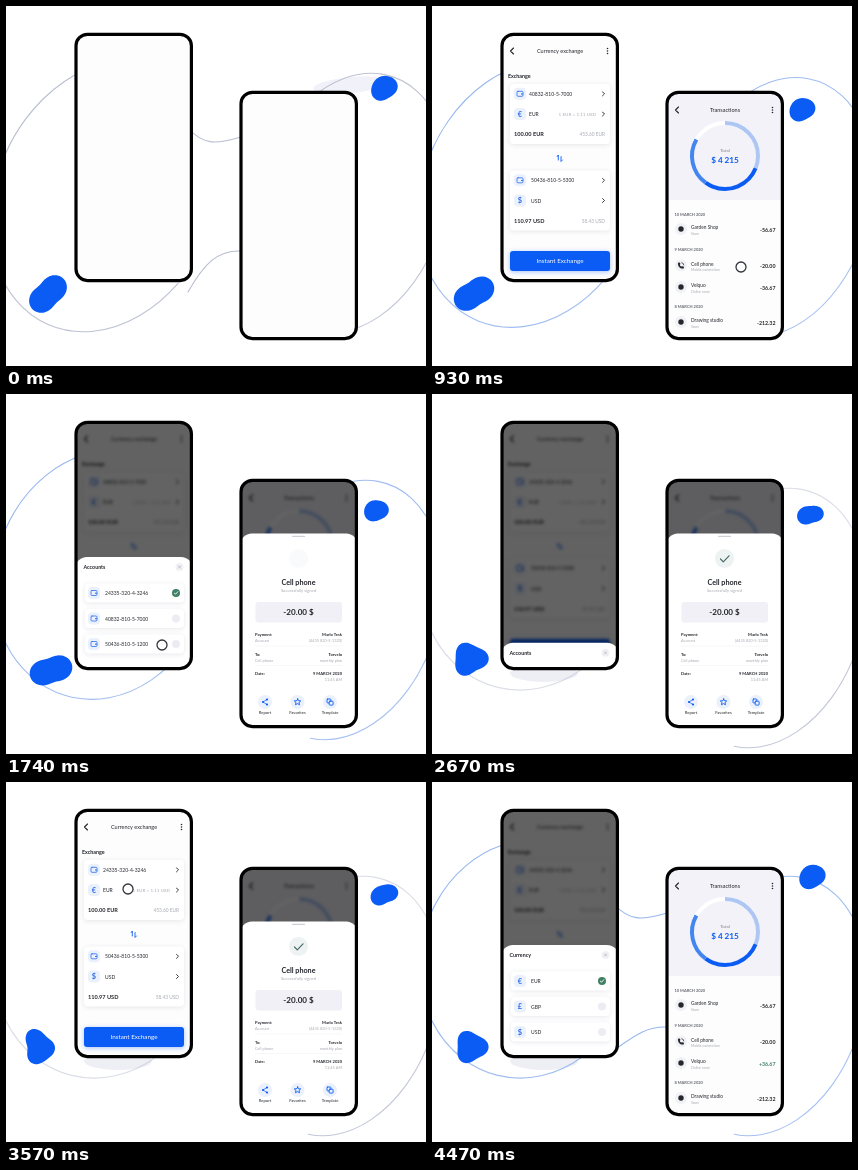
Animation of 420 by 360 pixels, one loop 4.5 s. Source, as an HTML page with a canvas:

```html
<!DOCTYPE html>
<html lang="en">
<head>
<meta charset="utf-8">
<title>Banking app</title>
<style>
html, body { margin: 0; width: 100%; height: 100%; overflow: hidden; background: #fff; }
canvas { display: block; width: 420px; height: 360px; }
</style>
</head>
<body>
<canvas id="stage"></canvas>
<script>
const W = 420, H = 360, LOOP = 4500, TAU = Math.PI * 2;
const PHONE_W = 115.4, PHONE_H = 246.3;
const BLUE = '#0a5cf5', INK = '#24262c', GREY = '#a6a9b2', PALE = '#eaf0fc', GREEN = '#3f7f63';
const ratio = window.devicePixelRatio || 1;
const stage = document.getElementById('stage'), buffer = document.createElement('canvas');
const [main, layer] = [stage, buffer].map(canvas => {
  canvas.width = W * ratio;
  canvas.height = H * ratio;
  const ctx = canvas.getContext('2d');
  ctx.scale(ratio, ratio);
  return ctx;
});
let g = main;

// Timing
const clamp = v => Math.min(1, Math.max(0, v));
const lerp = (a, b, u) => a + (b - a) * u;
const ramp = (t, a, b) => { const u = clamp((t - a) / (b - a)); return u * u * (3 - 2 * u); };
const easeOut = (t, a, b) => 1 - (1 - clamp((t - a) / (b - a))) ** 3;

// Drawing helpers
function text(str, x, y, size, color = INK, weight = 400, align = 'left') {
  g.font = `${weight} ${size}px Lato, Inter, sans-serif`;
  g.textAlign = align;
  g.fillStyle = color;
  g.fillText(str, x, y);
}
function box(x, y, w, h, r, color) {
  g.beginPath();
  g.roundRect(x, y, w, h, r);
  g.fillStyle = color;
  g.fill();
}
function dot(x, y, r, color) {
  g.beginPath();
  g.arc(x, y, r, 0, TAU);
  g.fillStyle = color;
  g.fill();
}
function stroke(color, width) {
  g.strokeStyle = color;
  g.lineWidth = width;
  g.lineCap = g.lineJoin = 'round';
  g.stroke();
}
function line(color, width, ...p) {
  g.beginPath();
  for (let i = 0; i < p.length; i += 2) g.lineTo(p[i], p[i + 1]);
  stroke(color, width);
}
function arc(x, y, r, from, to, color, width) {
  g.beginPath();
  g.arc(x, y, r, from, to);
  g.strokeStyle = color;
  g.lineWidth = width;
  g.lineCap = 'butt';
  g.stroke();
}
function shadowBox(x, y, w, h, r, color, shadow) {
  g.save();
  g.shadowColor = shadow;
  g.shadowBlur = 5 * ratio;
  g.shadowOffsetY = ratio;
  box(x, y, w, h, r, color);
  g.restore();
}
const card = (x, y, w, h) => shadowBox(x, y, w, h, 4, '#fff', 'rgba(40,50,90,.11)');
const chevron = (x, y) => line(INK, .9, x - 1, y - 2, x + 1, y, x - 1, y + 2);
function topBar(title, x, y) {
  line(INK, 1.1, x - 46.5, y - 3, x - 49.5, y, x - 46.5, y + 3);
  text(title, x, y + 1.7, 5.5, INK, 400, 'center');
  for (const dy of [-2.5, 0, 2.5]) dot(x + 47.5, y + dy, .8, INK);
}
function tile(symbol, x, y) {
  box(x - 6, y - 6, 12, 12, 4, PALE);
  if (symbol !== 'wallet') return text(symbol, x, y + 2.6, 7.4, '#2f6fe8', 700, 'center');
  g.beginPath();
  g.roundRect(x - 3, y - 2.5, 6, 5, 1);
  stroke('#2f6fe8', .8);
  line('#2f6fe8', .9, x + 1, y + .2, x + 2.8, y + .2);
}

// Blob outline: a circle bent by a two-lobed and a three-lobed wave
function blob(x, y, size, stretch, tilt, corners) {
  g.beginPath();
  for (let a = 0; a < TAU; a += .08) {
    const r = size * (1 + stretch * Math.cos(2 * (a - tilt)) + corners * Math.cos(3 * a));
    g.lineTo(x + r * Math.cos(a), y + r * Math.sin(a));
  }
  g.fillStyle = BLUE;
  g.fill();
}
function blobs(t) {
  const turn = ramp(t, 1740, 3400), back = ramp(t, 3800, 4470);
  blob(42 + 3 * ramp(t, 900, 1740) - 12 * turn + 6 * back, 288 - 23 * ramp(t, 800, 2670), 17 - 1.7 * turn,
    .28 - .4 * turn + .13 * back, -.78 + .48 * ramp(t, 200, 1740), .14 * ramp(t, 1740, 2670));
  const swing = Math.sin(Math.PI * t / 5000);
  blob(378 - 8 * (ramp(t, 0, 900) - ramp(t, 1740, 2600)) + 2 * back, 82 + 39 * swing, 12.6 - 1.6 * swing ** 2,
    .1 + .12 * (ramp(t, 1740, 2670) - back), -.6 + .4 * swing ** 2, .04);
}

// Two tilted rings behind the phones, joined by two short curves
function rings(t) {
  const shift = ramp(t, 400, 2500);
  const seen = 1 - ramp(t, 1700, 2600) + ramp(t, 3960, 4400);
  const joined = 1 - ramp(t, 200, 900) + ramp(t, 3960, 4400);
  const tint = ramp(t, 0, 900) * seen;
  const color = `rgb(${lerp(184, 150, tint)},${lerp(189, 182, tint)},${lerp(208, 240, tint)})`;
  const draw = alpha => {
    g.globalAlpha = clamp(alpha);
    stroke(color, 1.1);
  };
  const left = (from, to, alpha) => {
    g.beginPath();
    g.ellipse(lerp(100, 95, shift), lerp(190, 177, shift), lerp(109, 106, shift), lerp(141, 120, shift),
      lerp(.44, .27, shift), from, to);
    draw(alpha);
  };
  const right = (from, to, alpha) => {
    g.beginPath();
    g.ellipse(345 - 8 * shift, 197 + 27 * shift, 93, 133, .314, from, to);
    draw(alpha);
  };
  left(.35, 2.6, .5 + .4 * seen);
  left(2.6, 4.3, seen);
  right(-2.45, -.35, .5 + .4 * seen);
  right(-.35, 1.5, .85);
  for (const [y1, y2, y3, y4] of [[122, 140, 138, 131], [286 - 18 * shift, 258, 244, 245]]) {
    g.beginPath();
    g.moveTo(182, y1);
    g.bezierCurveTo(198, y2, 211, y3, 235, y4);
    draw(joined);
  }
}
function background(t) {
  g.globalAlpha = 1 - ramp(t, 0, 500);
  g.beginPath();
  g.ellipse(345, 79, 38, 8, -.1, 0, TAU);
  g.fillStyle = '#f1f2f9';
  g.fill();
  g.globalAlpha = ramp(t, 2000, 2600);
  g.beginPath();
  g.ellipse(112, 279, 34, 9, 0, 0, TAU);
  g.fillStyle = '#eeeef5';
  g.fill();
  rings(t);
  g.globalAlpha = 1;
  blobs(t);
}

// Left phone
const ACCOUNTS = ['24335-320-4-3246', '40832-810-5-7000', '50436-810-5-1200'];

function exchangeScreen(t) {
  box(69, 27, 118, 250, 0, '#fdfdfd');
  g.globalAlpha = ramp(t, 60, 450);
  topBar('Currency exchange', 128, 45);
  text('Exchange', 76, 72, 5.35, INK, 700);
  g.globalAlpha = ramp(t, 150, 600);
  exchangeCard(78, 97, ACCOUNTS[t < 2300 ? 1 : 0], '€', 'EUR', '100.00 EUR', '453.60 EUR');
  text('1 EUR = 1.11 USD', 164, 110, 4.6, GREY, 400, 'right');
  line(BLUE, .9, 125, 150.5, 126.3, 149, 126.3, 154);
  line(BLUE, .9, 129, 150.5, 129, 155.5, 130.4, 154);
  g.globalAlpha = ramp(t, 300, 750);
  exchangeCard(164.5, 99, '50436-810-5-5300', '$', 'USD', '110.97 USD', '58.43 USD');
  g.globalAlpha = ramp(t, 400, 850);
  shadowBox(78, 245, 100, 20, 3, BLUE, 'rgba(10,92,245,.35)');
  text('Instant Exchange', 128, 257.4, 6.3, '#fff', 400, 'center');
  g.globalAlpha = 1;
}
function exchangeCard(y, x, account, symbol, code, sum, rest) {
  card(78, y, 100, 60);
  [['wallet', account], [symbol, code]].forEach(([icon, label], i) => {
    const mid = y + 9.8 + 20.2 * i;
    tile(icon, 88, mid);
    text(label, x, mid + 2, 5);
    chevron(171.5, mid);
  });
  text(sum, 82, y + 52.2, 5.6, INK, 700);
  text(rest, 173, y + 52.2, 4.8, GREY, 400, 'right');
}
function choiceSheet(title, rows, checked, rise) {
  g.save();
  g.translate(0, (1 - rise) * 112);
  box(69, 163, 118, 130, 12, '#fff');
  text(title, 77.5, 175.3, 5.3, INK, 700);
  dot(173.5, 173, 4, '#f1f1f5');
  line(GREY, .6, 172.3, 171.8, 174.7, 174.2);
  line(GREY, .6, 174.7, 171.8, 172.3, 174.2);
  rows.forEach(([symbol, label], i) => {
    const y = 199 + i * 25.5;
    card(79, y - 9.5, 99, 19);
    tile(symbol, 88, y);
    text(label, 99, y + 2, 5);
    dot(170, y, 4, i === checked ? GREEN : '#ececf3');
    if (i === checked) line('#fff', .9, 168.3, y, 169.5, y + 1.3, 171.8, y - 1.3);
  });
  g.restore();
}
function leftSheets(t) {
  if (t < 3200) {
    choiceSheet('Accounts', ACCOUNTS.map(a => ['wallet', a]), t < 1620 ? 1 : 0,
      easeOut(t, 1360, 1680) - ramp(t, 2450, 2772));
  } else {
    choiceSheet('Currency', [['€', 'EUR'], ['£', 'GBP'], ['$', 'USD']], 0, easeOut(t, 3990, 4350));
  }
}

// Right phone
function handset(x, y) {
  arc(x + 2.2, y - 2.2, 4.6, Math.PI * .55, Math.PI * .95, INK, 1.5);
  dot(x - 1.9, y - 1.7, 1.2, INK);
  dot(x + 1.7, y + 1.9, 1.2, INK);
  arc(x + .2, y - .2, 2.6, -1.5, 0, INK, .7);
}
function donut(sweep) {
  const angle = degrees => (degrees - 90) * Math.PI / 180;
  arc(293, 150, 33, 0, TAU, '#fff', 4);
  for (const [from, to, color] of [[0, 112, '#adc6f3'], [112, 216, BLUE], [216, 300, '#4585ef']]) {
    if (sweep > from) arc(293, 150, 33, angle(from), angle(Math.min(to, sweep)), color, 4);
  }
  text('Total', 293, 146.3, 4.6, '#80848f', 400, 'center');
  text('$ 4 215', 293, 157.4, 8.2, BLUE, 700, 'center');
}
function transactionsScreen(t) {
  box(234, 85, 118, 250, 0, '#fdfdfd');
  g.globalAlpha = ramp(t, 60, 400);
  box(234, 85, 118, 109, 0, '#f2f2f8');
  topBar('Transactions', 293, 104);
  donut(ramp(t, 150, 880) * 300);
  g.globalAlpha = ramp(t, 250, 650);
  dateHeading('10 MARCH 2020', 210);
  transaction(223, 'Garden Shop', 'Store', '-56.67');
  g.globalAlpha = ramp(t, 350, 750);
  dateHeading('9 MARCH 2020', 245);
  transaction(259.5, 'Cell phone', 'Mobile connection', '-20.00');
  const received = t > 4150;
  transaction(281, 'Velquo', 'Online store', received ? '+36.67' : '-36.67', received ? GREEN : INK);
  g.globalAlpha = ramp(t, 450, 850);
  dateHeading('8 MARCH 2020', 302);
  transaction(316, 'Drawing studio', 'Store', '-212.32');
  g.globalAlpha = 1;
}
const dateHeading = (date, y) => text(date, 242.5, y, 4, '#62656e', 700);
function transaction(y, name, kind, sum, color = INK) {
  dot(249, y, 6, '#f0f1f5');
  if (name === 'Cell phone') handset(249, y);
  else dot(249, y, 2.7, INK);
  text(name, 259, y + .4, 4.8);
  text(kind, 259, y + 5.5, 3.5, GREY);
  text(sum, 343.5, y + 2.6, 5.3, color, 700, 'right');
}
function receiptSheet(t) {
  const rise = easeOut(t, 1080, 1500) - ramp(t, 3640, 4005);
  g.save();
  g.translate(0, (1 - rise) * 195);
  box(234, 139.5, 118, 215, 12, '#fff');
  box(286, 141.8, 13, 1.2, .6, '#cfd0d6');
  g.globalAlpha = ramp(t, 1560, 2000);
  dot(292.5, 164.5, 9.5, '#edf2f3');
  g.globalAlpha = 1;
  const tick = ramp(t, 1900, 2250);
  if (tick > 0) {
    g.setLineDash([13 * tick, 20]);
    line('#4d6b66', 1.2, 288.5, 165, 291.3, 167.8, 297, 161.8);
    g.setLineDash([]);
  }
  text('Cell phone', 292.5, 190.7, 7.2, INK, 700, 'center');
  text('Successfully signed', 292.5, 198, 4.2, GREY, 400, 'center');
  box(249.5, 208, 86.5, 20.5, 3, '#f0f0f6');
  text('-20.00 $', 292.5, 221, 8.1, INK, 700, 'center');
  [['Payment:', 'Marlo Tesk', 'Account', '(4435 820-5-1320)'],
   ['To:', 'Torvelo', 'Cell phone', 'monthly plan'],
   ['Date:', '9 MARCH 2020', '', '11:45 AM']].forEach(([label, value, note, detail], i) => {
    const y = 242 + i * 19.5;
    text(label, 249, y, 4.1, INK, 700);
    text(value, 336, y, 4.1, INK, 700, 'right');
    text(note, 249, y + 6, 3.9, GREY);
    text(detail, 336, y + 6, 3.9, GREY, 400, 'right');
    if (i < 2) line('#eeeef3', .5, 249, y + 10, 336, y + 10);
  });
  [[shareIcon, 'Report'], [starIcon, 'Favorites'], [copyIcon, 'Template']].forEach(([icon, label], i) => {
    const x = 259 + 32.5 * i;
    dot(x, 308, 7, PALE);
    icon(x, 308);
    text(label, x, 319.7, 4.2, INK, 400, 'center');
  });
  g.restore();
}
function shareIcon(x, y) {
  line(BLUE, .7, x + 2, y - 2.5, x - 2, y, x + 2, y + 2.5);
  for (const d of [-1, 0, 1]) dot(x + (d ? 2 : -2), y + 2.5 * d, 1.1, BLUE);
}
function starIcon(x, y) {
  g.beginPath();
  for (let i = 0; i < 10; i++) {
    const r = i % 2 ? 1.6 : 3.4, a = i * TAU / 10 - TAU / 4;
    g.lineTo(x + r * Math.cos(a), y + r * Math.sin(a));
  }
  g.closePath();
  stroke(BLUE, .9);
}
function copyIcon(x, y) {
  for (const d of [-3, -.8]) {
    box(x + d, y + d, 3.9, 3.9, .7, PALE);
    stroke(BLUE, .9);
  }
}

function phone(x, y, t, screen, sheets, dim) {
  const frame = () => {
    g.beginPath();
    g.roundRect(x, y, PHONE_W, PHONE_H, 11.5);
  };
  g = layer;
  screen(t);
  g = main;
  g.save();
  frame();
  g.clip();
  g.filter = dim > .01 ? `blur(${1.5 * dim * ratio}px)` : 'none';
  g.drawImage(buffer, 0, 0, W, H);
  g.filter = 'none';
  g.fillStyle = `rgba(0,0,0,${.61 * dim})`;
  g.fillRect(x, y, PHONE_W, PHONE_H);
  sheets(t);
  g.restore();
  frame();
  stroke('#000', 3.2);
}

function cursor(t, start, end, x, y, press) {
  const alpha = ramp(t, start, start + 120) * (1 - ramp(t, end - 120, end));
  if (!alpha) return;
  g.globalAlpha = alpha;
  const r = 5 - 1.2 * ramp(t, press - 80, press) * (1 - ramp(t, press, press + 80));
  dot(x, y, r, 'rgba(255,255,255,.55)');
  stroke('#33353c', 1.3);
  g.globalAlpha = 1;
}

function render(t) {
  g = main;
  g.clearRect(0, 0, W, H);
  background(t);
  phone(70, 28.3, t, exchangeScreen, leftSheets,
    ramp(t, 1240, 1500) - ramp(t, 2690, 3000) + ramp(t, 3780, 4085));
  phone(235, 86.3, t, transactionsScreen, receiptSheet, ramp(t, 1060, 1400) - ramp(t, 3760, 4160));
  cursor(t, 720, 1120, 309, lerp(275, 261, ramp(t, 720, 900)), 1020);
  const toList = ramp(t, 1300, 1560), away = ramp(t, 1620, 1740);
  cursor(t, 1080, 1960, lerp(lerp(122, 168, toList), 156, away),
    lerp(lerp(88, 200, toList), 251, away), 1230);
  cursor(t, 3340, 3860, 122, lerp(122, 107, ramp(t, 3340, 3540)), 3700);
}

function tick() {
  render(performance.now() % LOOP);
  requestAnimationFrame(tick);
}
tick();
</script>
</body>
</html>
```
